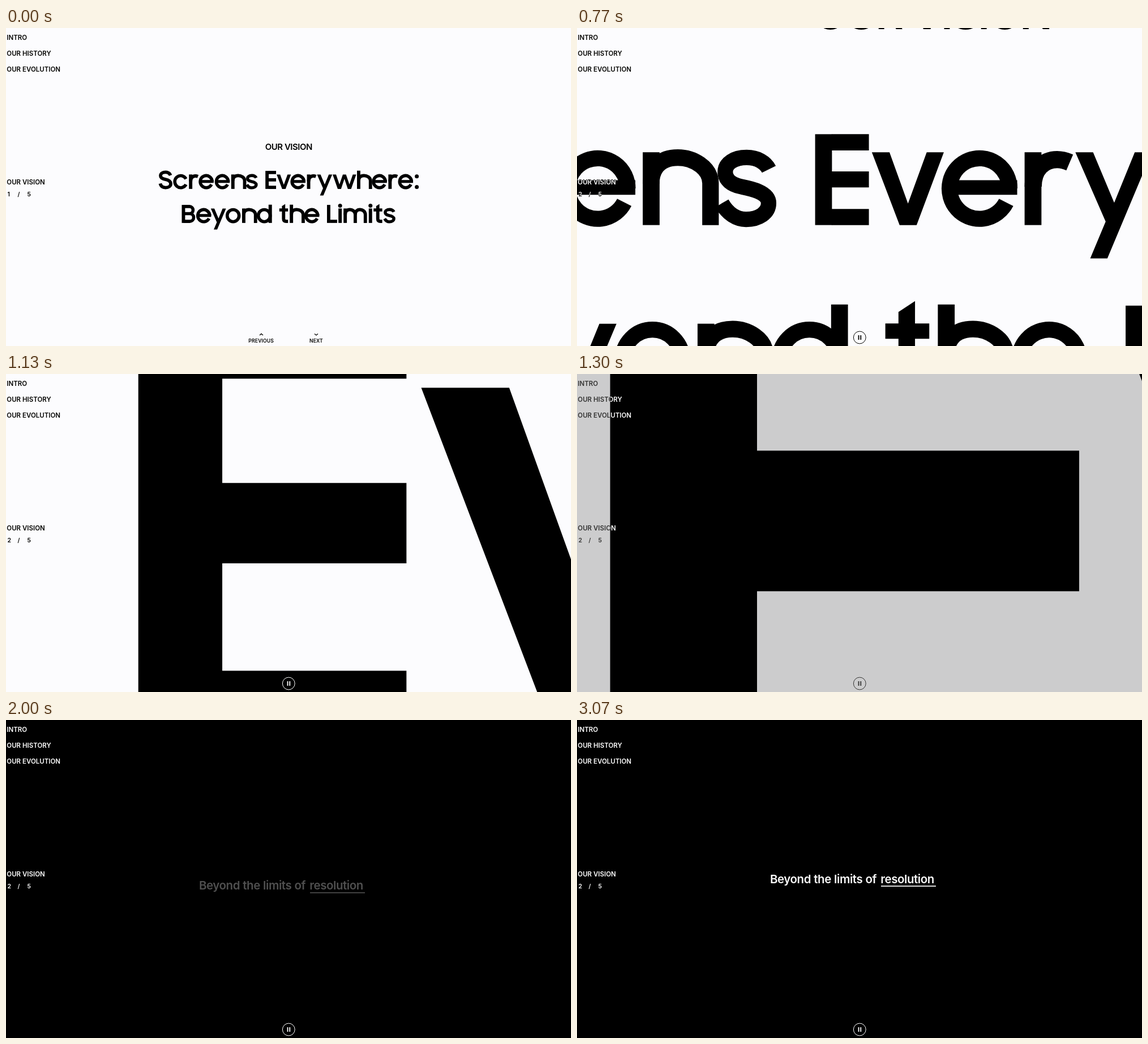
These frames come from a looping animation (998 by 561 pixels, 3100 ms). An HTML page:

```html
<!DOCTYPE html>
<html lang="en">
<head>
<meta charset="utf-8">
<title>Our Vision</title>
<style>
  html, body { margin: 0; width: 100%; height: 100%; overflow: hidden; background: #000; }
  svg { display: block; width: 998px; height: 561px; font-family: Inter, "Open Sans", sans-serif; font-weight: 600; }
  #hud { mix-blend-mode: difference; fill: #fff; font-size: 11.5px; }
  #hud .line { fill: none; stroke: #fff; }
  #count { font-size: 10.5px; }
  #pager { font-size: 8.6px; letter-spacing: .15px; text-anchor: middle; }
  #label { font-size: 15px; letter-spacing: -.5px; text-anchor: middle; }
  #sub { fill: #fff; font-size: 20.5px; letter-spacing: -.45px; word-spacing: .5px; }
</style>
</head>
<body>
<svg viewBox="0 0 998 561">
  <rect id="bg" width="998" height="561"/>
  <g id="title">
    <text id="label" x="499.3" y="215.4">OUR VISION</text>
    <g id="lines" role="img" aria-label="Screens Everywhere: Beyond the Limits"></g>
  </g>
  <g id="sub">
    <text x="341" y="287.3">Beyond the limits of</text>
    <text x="536.3" y="287.3">resolution</text>
    <rect x="537" y="291.9" width="97" height="1.7"/>
  </g>
  <g id="hud">
    <text x="1.3" y="21">INTRO</text>
    <text x="1.3" y="49">OUR HISTORY</text>
    <text x="1.3" y="77">OUR EVOLUTION</text>
    <text x="1.3" y="276">OUR VISION</text>
    <text id="count" x="2.4 20.5 37.4" y="296.8">1/5</text>
    <g id="pager">
      <path class="line" stroke-width="1.3" d="M448 542l3-2.6 3 2.6M545 539.4l3 2.6 3-2.6"/>
      <text x="450.7" y="555">PREVIOUS</text>
      <text x="548" y="555">NEXT</text>
    </g>
    <g id="pause">
      <circle class="line" cx="499.3" cy="546" r="10.9"/>
      <path d="M496.6 542h1.8v8h-1.8zM500.4 542h1.8v8h-1.8z"/>
    </g>
  </g>
</svg>
<script>
const $ = id => document.getElementById(id);
const LOOP = 3100, FOCUS = [467.5, 268.1];

// Headline glyphs, drawn at five times their resting size: x-height 219.6, baseline 347.
const XH = 219.6, BASE = 347, CAP = 188;
const stroke = (d, w = 28) =>
  `<path d="${d}" fill="none" stroke="#000" stroke-width="${w}"/>`;
const poly = pts => `<polygon points="${pts}"/>`;
const dot = (x, y) => `<circle cx="${x}" cy="${y}" r="17.5"/>`;
const stem = (x, top = XH) => `<rect x="${x}" y="${top}" width="29.5" height="${BASE - top}"/>`;
const shift = (x, art) => `<g transform="translate(${x})">${art}</g>`;

const bowl = cx => `<ellipse cx="${cx}" cy="283" rx="52.3" ry="53" fill="none" stroke="#000" stroke-width="28"/>`;
const arch = (x, w = 104) => stroke(
  `M${x + 14.7} 275c0-29 16.5-46 ${w * .45}-46c26 0 ${w * .55} 17 ${w * .55} 45V347`, 29);
const glyph = {
  c: x => stroke(`M${x + 112.7} 258.7A52.5 53 0 1 0 ${x + 112.7} 307.3`),
  e: x => stroke(`M${x + 118.5} 283A52.5 53 0 1 0 ${x + 112.7} 307.3`) +
    stroke(`M${x + 14} 281.3H${x + 132}`, 25.5),
  o: x => bowl(x + 66),
  d: x => bowl(x + 66) + stem(x + 104, 186),
  n: x => stem(x) + arch(x),
  h: x => stem(x, 186) + arch(x),
  m: x => stem(x) + arch(x, 89) + arch(x + 89, 89),
  i: x => stem(x) + dot(x + 14.7, 195),
  r: x => stem(x) + shift(x, stroke("M15 280C15 249 34 232.5 57 232.5C65 232.5 72 234.5 79 237.5", 30)),
  s: x => shift(x, stroke("M94 249.4C88 237.4 74 228.8 55 228.8C33 228.8 17.5 239 17.5 254" +
    "C17.5 268 28 276 45 279.7C56 282 93.5 288 93.5 308.5C93.5 326 76 337 54 337C37 337 22 327 11.5 309", 27)),
  S: x => shift(x, stroke("M105 228C98 209 82 199.5 61 199.5C35 199.5 17 212 17 231" +
    "C17 250 34 257.5 61 263C89 269 107 279 107 301C107 322 88 335.5 61 335.5C35 335.5 19 322 14 300", 29)),
  t: x => shift(x, poly("23,199 52,180 52,240 23,240") + stroke("M0 232.6H77", 27) +
    stroke("M37.5 230V310Q37.5 333 60 333H77", 29)),
  v: x => shift(x, poly("0,219.6 30.9,219.6 63.3,309.5 96.1,219.6 126.1,219.6 78.4,347 48.6,347")),
  y: x => shift(x, poly("0,219.6 31,219.6 68,308 104,219.6 134,219.6 56,405.5 26,405.5 53,341")),
  w: x => shift(x, poly("0,219.6 30,219.6 60,308 90,219.6 118,219.6 148,308 178,219.6 208,219.6 " +
    "163,347 134,347 104,258 74,347 45,347")),
  E: x => stem(x, CAP) + shift(x, "<path d='M29 188H94.2V216.4H29zM29 253H94.2V281.2H29zM29 318.9H94.2V347H29z'/>"),
  L: x => stem(x, CAP) + shift(x, "<path d='M29 318.9H90V347H29z'/>"),
  B: x => stem(x, CAP) + shift(x, stroke("M15 202H68a31.5 31.5 0 0 1 0 63H15M68 265h3a34 34 0 0 1 0 68H15")),
  ":": x => dot(x, 236) + dot(x, 330)
};
const setLine = (chars, xs) => [...chars].map((ch, i) => glyph[ch](xs[i])).join("");

$("lines").setAttribute("transform",
  `translate(${FOCUS}) scale(.2) translate(${FOCUS.map(v => -v)})`);
$("lines").innerHTML =
  setLine("ScreensEverywhere:", [-522, -393, -254, -168, -26, 119, 246,
    421, 520.4, 643, 788, 877, 1015, 1230, 1362, 1507, 1593, 1758]) +
  `<g transform="translate(0 300)">` +
  setLine("BeyondtheLimits", [-317.5, -190, -61, 70, 215, 345,
    544, 636, 765, 965, 1066, 1111, 1334, 1376, 1462]) + "</g>";

const span = (t, from, to) => Math.min(1, Math.max(0, (t - from) / (to - from)));

function draw(t) {
  const zoom = 1 + (Math.max(0, Math.min(t, 1760) - 329) / 277.5) ** 3;
  $("title").setAttribute("transform",
    `translate(${FOCUS}) scale(${zoom}) translate(${FOCUS.map(v => -v)})`);

  const light = (1 + Math.cos(Math.PI * span(t, 1118, 1752))) / 2;
  const level = Math.round(252 * light);
  $("bg").setAttribute("fill", `rgb(${level},${level},${Math.round(254 * light)})`);

  const swap = span(t, 20, 180);
  $("pager").setAttribute("opacity", 1 - swap);
  $("pause").setAttribute("opacity", swap);
  $("count").textContent = t < 330 ? "1/5" : "2/5";

  const rise = 1 - (1 - span(t, 1800, 3530)) ** 3;
  $("sub").setAttribute("opacity", rise);
  $("sub").setAttribute("transform", `translate(0 ${17.3 * (1 - rise)})`);
}

const start = performance.now();
function tick() {
  draw((performance.now() - start) % LOOP);
  requestAnimationFrame(tick);
}
tick();
</script>
</body>
</html>
```
